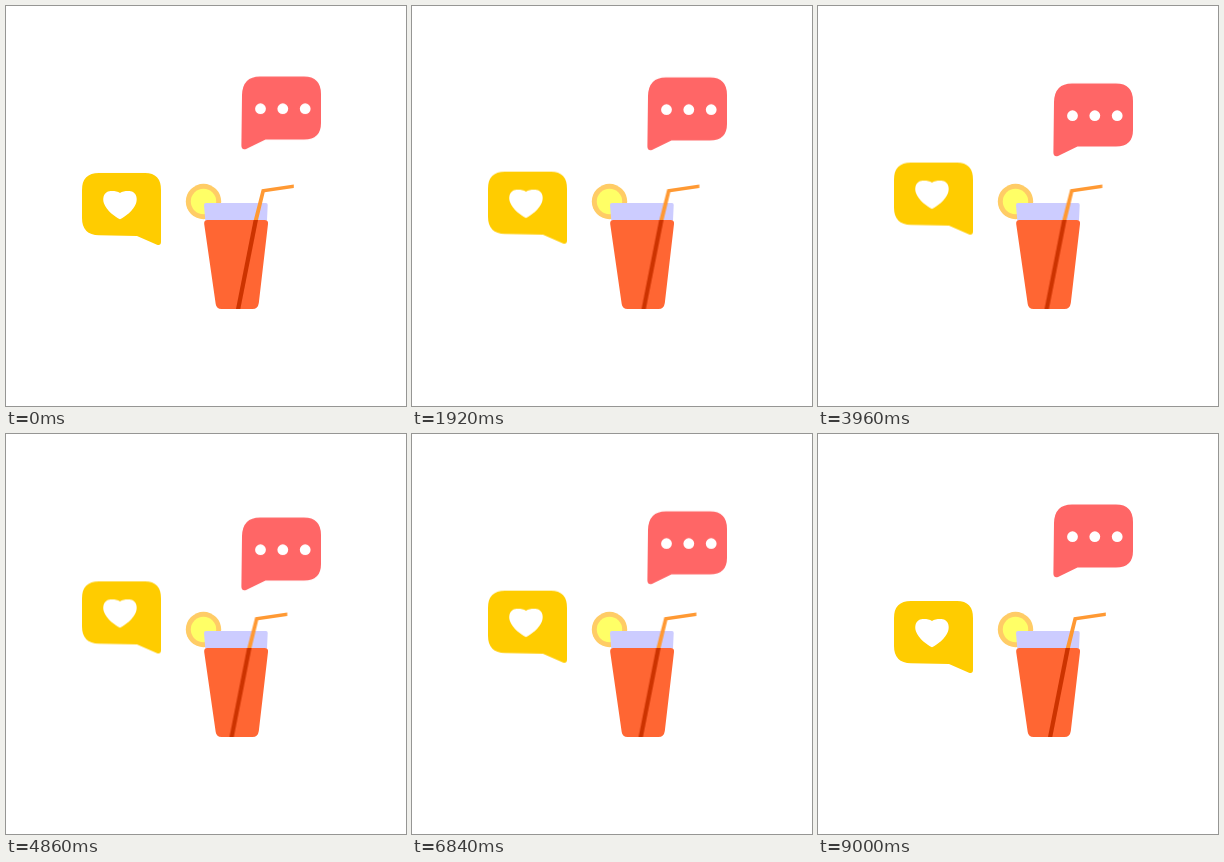
An HTML page without scripts that plays this animation: 400 px wide and 400 px high, repeating every 9030 ms.

```html
<!DOCTYPE html>
<html lang="en">
<head>
<meta charset="utf-8">
<title>Drink and chat</title>
<style>
  html, body { margin: 0; width: 100%; height: 100%; overflow: hidden; background: #fff; }
  svg { display: block; width: 100%; height: 100%; }

  /* five sine swings of 1800 ms, then a 30 ms rest */
  .sway { animation: sway 9030ms cubic-bezier(.3642, 0, .6358, 1) infinite; }
  .pink { --move: translate(0, 20px); }
  .yellow { --move: translate(0, -30px); }
  .straw { --move: translate(-10px, 0); }
  @keyframes sway {
    0%, 19.934%, 39.867%, 59.801%, 79.734%, 99.668%, 100% { transform: translate(0, 0); }
    9.967%, 29.9%, 49.834%, 69.767%, 89.701% { transform: var(--move); }
  }
</style>
</head>
<body>
<svg viewBox="0 0 400 400">
  <g class="sway pink">
    <path fill="#f66" d="M254 70.5H298Q315 70.5 315 88V117Q315 133.5 298 133.5H259.5L240 143Q235.3 144 235.4 139.5L236 89Q236.5 70.5 254 70.5Z"/>
    <g fill="#fff">
      <circle cx="254.5" cy="102.7" r="5.4"/>
      <circle cx="276.8" cy="102.7" r="5.4"/>
      <circle cx="299.2" cy="102.7" r="5.4"/>
    </g>
  </g>

  <g class="sway yellow">
    <path fill="#fc0" d="M93 167H139Q155 167 155 184V236Q155 239.8 151 238.8L131 230L93 229.2Q76 229 76 212V184Q76 167 93 167Z"/>
    <path fill="#fff" d="M114 187C117.500 184.800 124 184.600 127 186C130.500 188 131.600 193 130 197.500C127.500 204.500 119 211 114 213.200C109 211 100.500 204.500 98 197.500C96.400 193 97.500 188 101 186C104 184.600 110.500 184.800 114 187Z"/>
  </g>

  <circle cx="197.500" cy="195.500" r="17.700" fill="#fc6"/>
  <circle cx="197.500" cy="195.500" r="12.700" fill="#ff6"/>
  <path fill="#ccf" d="M200 197H260Q261.800 197 261.700 199L261 214.500H199.300L198 199Q198 197 200 197Z"/>
  <path fill="#f63" d="M201.500 214H258.500Q262.500 214 262 218L252.800 297Q252 303 246.500 303H215.500Q210.500 303 209.700 298L198.200 218Q197.800 214 201.500 214Z"/>

  <g class="sway straw">
    <path fill="#f93" d="M255.700 183.200L287.800 178.500V182L258.700 186.200L252 214H247.800Z"/>
    <path fill="#c30" d="M247.600 214H252L234.300 303H230Z"/>
  </g>
</svg>
</body>
</html>
```
